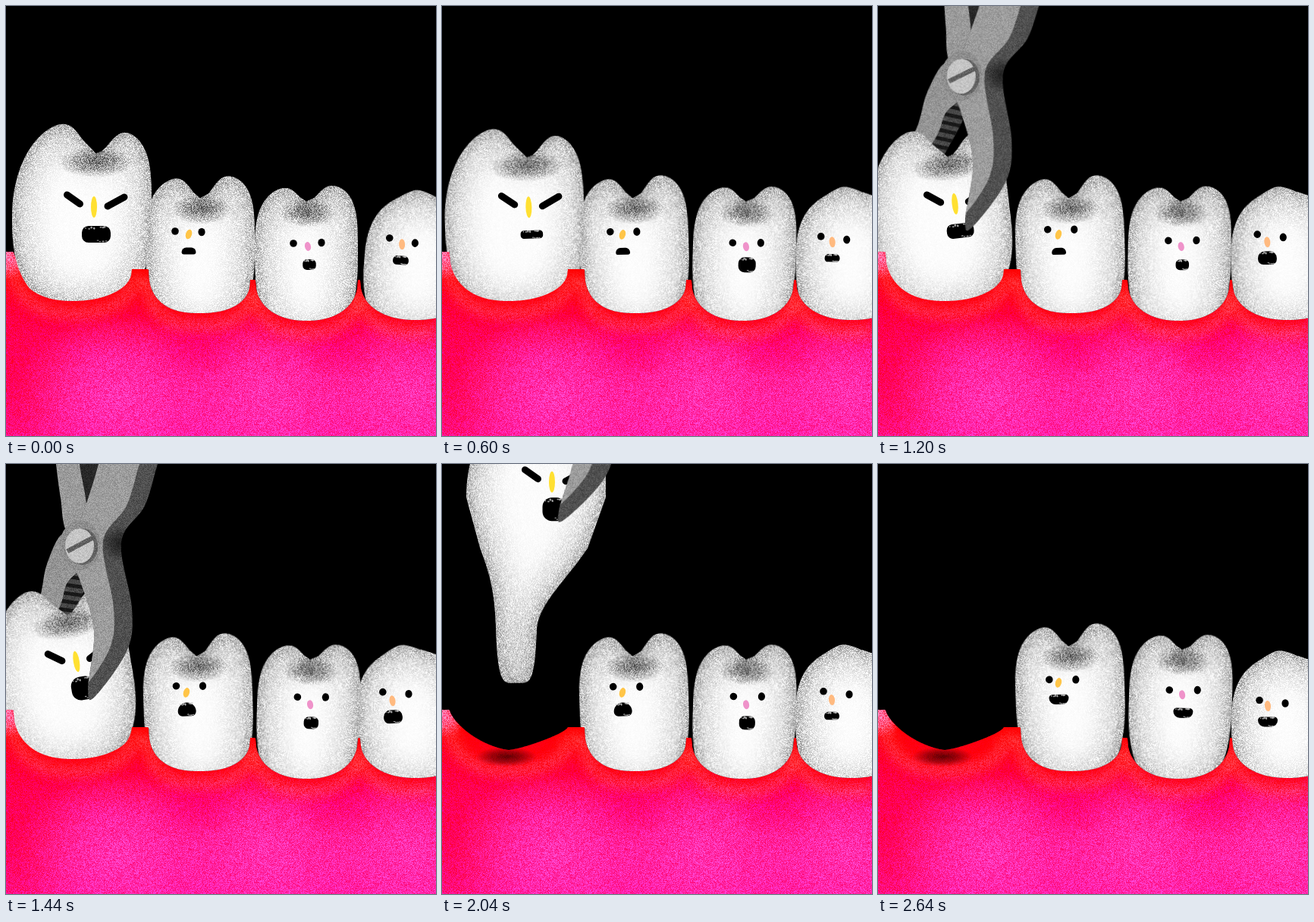
An HTML page with a canvas that plays this animation: 567 px wide and 567 px high, repeating every 2760 ms.

```html
<!DOCTYPE html>
<html lang="en">
<head>
<meta charset="utf-8">
<title>Tooth pulling</title>
<style>
html, body { margin: 0; width: 100%; height: 100%; overflow: hidden; background: #000; }
canvas { display: block; }
</style>
</head>
<body>
<canvas id="stage" width="567" height="567"></canvas>
<script>
const SIZE = 567, STEP = 120, STEPS = 23, PAD = 80;
const GRAB = 6, GRIP = 12, CHEER = 18, GONE = 20;
const ctx = document.getElementById('stage').getContext('2d');

const mix = (a, b, t) => a + (b - a) * t;
const unit = t => Math.max(0, Math.min(1, t));
const smooth = t => { t = unit(t); return t * t * (3 - 2 * t); };
const bump = (s, centre, width) => Math.exp(-(((s - centre) / width) ** 2));
const radians = degrees => degrees * Math.PI / 180;
const power = (v, p) => Math.sign(v) * Math.abs(v) ** p;

function randomizer(seed) {
  return () => {
    seed = (seed + 0x6D2B79F5) | 0;
    let t = Math.imul(seed ^ (seed >>> 15), 1 | seed);
    t = (t + Math.imul(t ^ (t >>> 7), 61 | t)) ^ t;
    return ((t ^ (t >>> 14)) >>> 0) / 4294967296;
  };
}

// Smooth closed curve through flat x, y pairs.
function curve(p) {
  const n = p.length / 2, path = new Path2D();
  const at = i => [p[2 * ((i + n) % n)], p[2 * ((i + n) % n) + 1]];
  path.moveTo(p[0], p[1]);
  for (let i = 0; i < n; i++) {
    const [a, b, c, d] = [at(i - 1), at(i), at(i + 1), at(i + 2)];
    path.bezierCurveTo(b[0] + (c[0] - a[0]) / 6, b[1] + (c[1] - a[1]) / 6,
      c[0] - (d[0] - b[0]) / 6, c[1] - (d[1] - b[1]) / 6, c[0], c[1]);
  }
  path.closePath();
  return path;
}

// Paints once, then adds grain that is strongest in the mid tones.
function sprite(grain, seed, paint) {
  const canvas = document.createElement('canvas');
  canvas.width = canvas.height = SIZE + 2 * PAD;
  const g = canvas.getContext('2d');
  g.translate(PAD, PAD);
  paint(g);
  const image = g.getImageData(0, 0, canvas.width, canvas.height);
  const d = image.data, random = randomizer(seed);
  for (let i = 0; i < d.length; i += 4) {
    const r = (random() - 0.5) * grain;
    for (let c = i; c < i + 3; c++) d[c] += r * d[c] * (255 - d[c]) / 16256;
  }
  g.putImageData(image, 0, 0);
  return canvas;
}

function glow(g, x, y, rx, ry, rgb, alpha) {
  const fade = g.createRadialGradient(0, 0, 0, 0, 0, 1);
  fade.addColorStop(0, `rgba(${rgb},${alpha})`);
  fade.addColorStop(0.5, `rgba(${rgb},${alpha * 0.6})`);
  fade.addColorStop(1, `rgba(${rgb},0)`);
  g.save();
  g.translate(x, y);
  g.scale(rx, ry);
  g.fillStyle = fade;
  g.fillRect(-1, -1, 2, 2);
  g.restore();
}

// Only the shadow of the stroke lands on the canvas.
function softStroke(g, path, width, blur, color, dy = 0) {
  g.save();
  g.shadowColor = color;
  g.shadowBlur = blur;
  g.shadowOffsetX = 2000;
  g.translate(-2000, dy);
  g.lineWidth = width;
  g.stroke(path);
  g.restore();
}

// Gum line: a rounded dip for each tooth between two rims.
const sockets = [
  { from: 188, to: 322, rims: [348, 361], bottom: 405, round: 2.4 },
  { from: 329, to: 464, rims: [362, 362], bottom: 415, round: 2.2 },
  { from: 467, to: 614, rims: [362, 362], bottom: 414, round: 2.2 }
];
const filled = { from: 10, to: 166, rims: [325, 347], bottom: 389, round: 2.2 };
const empty = { ...filled, bottom: 377, round: 1.4 };

function gumLine(firstSocket) {
  const path = new Path2D();
  for (let x = 0; x <= SIZE; x++) {
    const dip = [firstSocket, ...sockets].find(d => x >= d.from && x <= d.to);
    let y = x < 10 ? 324 : x < 200 ? 347 : 361;
    if (dip) {
      const t = (x - dip.from) / (dip.to - dip.from), rim = mix(...dip.rims, t);
      y = rim + (dip.bottom - rim) * (1 - Math.abs(2 * t - 1) ** dip.round) ** (1 / dip.round);
    }
    path.lineTo(x, y);
  }
  return path;
}

function closedAt(line, y) {
  const path = new Path2D(line);
  path.lineTo(SIZE, y);
  path.lineTo(0, y);
  path.closePath();
  return path;
}

const toothLine = gumLine(filled), gumArea = closedAt(gumLine(empty), SIZE);
const aboveGum = closedAt(toothLine, -100);

const gum = sprite(120, 5, g => {
  const base = g.createLinearGradient(0, 350, 0, SIZE);
  base.addColorStop(0, '#ff0008');
  base.addColorStop(0.25, '#ff0038');
  base.addColorStop(0.5, '#ff0878');
  base.addColorStop(1, '#ff18a0');
  g.fillStyle = base;
  g.fill(gumArea);
  g.clip(gumArea);
  glow(g, 0, 480, 120, 140, '255,0,70', 0.8);
  for (const x of [150, 345, 535]) glow(g, x, 510, 135, 105, '255,58,184', 0.8);
  for (const x of [255, 440]) glow(g, x, 450, 60, 45, '255,0,110', 0.5);
  softStroke(g, toothLine, 22, 22, 'rgba(255,0,0,.85)');
  softStroke(g, toothLine, 7, 16, 'rgba(255,110,115,.75)', 17);
  glow(g, 2, 332, 30, 30, '255,120,180', 0.95);
});

const hole = sprite(100, 6, g => {
  g.clip(gumArea);
  glow(g, 85, 386, 40, 13, '45,0,0', 0.75);
});

// Superellipse with a dent between the cusps; with a root the lower half narrows to a stem.
function outline({ cx, cy, w, top, bottom, left, right, dent, at, tilt }, root) {
  const path = new Path2D(), count = 160;
  for (let i = 0; i < count; i++) {
    const a = i / count * 2 * Math.PI, c = Math.cos(a), s = Math.sin(a);
    const n = s > 0 ? (root ? 5 : 2.6) : c < 0 ? left : right;
    const u = power(c, 2 / n), v = power(s, 2 / n);
    let x = cx + w * u, y = cy + (cy - top) * v;
    if (v < 0) {
      y += dent * bump(u, at, 0.27) - tilt * u * v;
    } else {
      y = cy + ((root || bottom) - cy) * v;
      const stem = root ? smooth((y - cy) / 175) : 0;
      x = mix(cx, 74, stem * stem) + mix(w, 28, stem) * u;
    }
    path.lineTo(x, y);
  }
  path.closePath();
  return path;
}

function toothSprite(shape, seed, root) {
  const path = outline(shape, root), { cx, w, top, at, dent } = shape;
  return sprite(150, seed, g => {
    g.fillStyle = '#fcfcfc';
    g.fill(path);
    g.clip(path);
    softStroke(g, path, 14, 46, 'rgba(0,0,0,.55)');
    softStroke(g, path, 7, 14, 'rgba(0,0,0,.34)');
    if (dent > 0) glow(g, cx + w * at, top + dent + 14, w * 0.55, 20, '0,0,0', 0.5);
  });
}

// A tooth says how it leans, hops and talks; its face is placed in its own upright frame.
const bigShape = { cx: 100, cy: 277, w: 92, top: 152, bottom: 399, left: 2, right: 4,
  dent: 40, at: 0.2, tilt: 11 };
const lift = s => Math.max(0, s - GRIP);

const bigTooth = {
  angry: true, base: [95, 389], eyes: [89, 255, 56, 3], nose: [116, 265], mouth: [119, 301],
  noseLook: ['#ffe032', 4, 14, 0],
  art: toothSprite(bigShape, 11), pulledArt: toothSprite(bigShape, 11, 522),
  lean: s => s <= GRIP ? -9.5 * (s / GRIP) ** 2 : -9.5 * (1 - unit(lift(s) / 3)),
  shift: s => [-6 * unit(s / GRIP) ** 2 + 0.24 * lift(s) ** 3,
    6 * unit(s / 5) - 11.8 * lift(s) ** 1.87],
  look: s => [5 * unit(s / 8), -8 * unit(s / 8)],
  talk: { width: 38, mid: 16, swing: 6, period: 12, phase: 0, bend: 0 }
};

const cheer = (s, start) => s < CHEER ? 0 : -13 * Math.sin(Math.PI * (s - start) / 6) ** 2;
const glance = s => [6 * unit(s / 15), -6 * bump(s, 14, 5)];

const smallTeeth = [{
  base: [540, 414], eyes: [497, 304, 34, 4], nose: [514, 311], mouth: [514, 332],
  noseLook: ['#ffba80', 4, 7, -6],
  art: toothSprite({ cx: 538, cy: 333, w: 72, top: 246, bottom: 432, left: 2.5, right: 2.5,
    dent: -8, at: -0.12, tilt: 0 }, 14),
  lean: s => 4.5 * Math.exp(-s / 2) - 2.5 * bump(s, 12, 1.5),
  shift: s => [0, 5 * Math.exp(-s / 2) + (s < CHEER ? 0 : 8 + cheer(s, 16))],
  look: glance,
  talk: { width: 25, mid: 13.5, swing: 4.5, period: 16, phase: 11, bend: -0.2 }
}, {
  base: [390, 415], eyes: [379, 313, 37, -1], nose: [398, 317], mouth: [400, 341],
  noseLook: ['#ef93ca', 4, 6, -12],
  art: toothSprite({ cx: 396, cy: 325, w: 68, top: 235, bottom: 445, left: 3, right: 3.5,
    dent: 23, at: 0.03, tilt: -3 }, 13),
  lean: s => s < GRIP ? 2 * Math.sin(Math.PI * s / 8) ** 2 : 1.8,
  shift: s => [0, cheer(s, 19)],
  look: s => [2 * unit(s / 8), -7 * bump(s, 15, 6)],
  talk: { width: 23, mid: 17, swing: 3, period: 10, phase: 5, bend: 0 }
}, {
  base: [255, 405], eyes: [223, 297, 35, 1], nose: [241, 301], mouth: [241, 323],
  noseLook: ['#ffc548', 4, 6.5, 18],
  art: toothSprite({ cx: 256, cy: 315, w: 72, top: 222, bottom: 438, left: 3, right: 3.5,
    dent: 32, at: 0.03, tilt: -3 }, 12),
  lean: s => -1.7 * (1 - Math.exp(-s)),
  shift: s => [0, cheer(s, 19)],
  look: glance,
  talk: { width: 24, mid: 13, swing: 5, period: 5, phase: 12, bend: -0.8 }
}];

// Both arms are drawn around this pivot at the moment of gripping.
const PIVOT = [98, 107];

const pliersBack = sprite(45, 21, g => {
  const shape = (color, points) => {
    const path = curve(points);
    g.fillStyle = color;
    g.fill(path);
    return path;
  };
  shape('#282828', [92, -60, 97, 0, 105, 50, 122, 0, 132, -60]);
  shape('#9a9a9a', [60, -60, 66, 0, 72, 45, 80, 88, 108, 88, 105, 45, 97, 0, 92, -60]);
  const grip = shape('#484848', [76, 135, 108, 145, 86, 205, 58, 254, 36, 251, 60, 190]);
  g.save();
  g.clip(grip);
  g.strokeStyle = '#181818';
  g.lineWidth = 5;
  for (let y = 140; y < 270; y += 11) {
    g.beginPath();
    g.moveTo(20, y);
    g.lineTo(120, y + 14);
    g.stroke();
  }
  g.restore();
  shape('#949494', [76, 92, 54, 132, 43, 182, 15, 242, 37, 250, 70, 190, 80, 158, 100, 130]);
});

const pliersFront = sprite(45, 22, g => {
  const body = curve([135, -60, 122, 0, 105, 55, 82, 115, 97, 152, 116, 220, 108, 298, 118, 306,
    160, 245, 166, 190, 152, 103, 183, 55, 200, 0, 220, -60]);
  g.fillStyle = '#505050';
  g.fill(body);
  g.save();
  g.clip(body);
  g.translate(-24, 0);
  g.fillStyle = '#9c9c9c';
  g.fill(body);
  g.translate(24, 0);
  glow(g, 152, 105, 28, 24, '0,0,0', 0.6);
  g.restore();
  disc(g, 98, 107, 27, 33, 0, '#8e8e8e');
  disc(g, 101, 109, 20, 24, 0, '#626262');
  disc(g, 97, 108, 19, 23, 0, '#c4c4c4');
  g.strokeStyle = '#606060';
  g.lineWidth = 6;
  g.beginPath();
  g.moveTo(81, 115);
  g.lineTo(115, 97);
  g.stroke();
});

function disc(g, x, y, rx, ry, degrees, color) {
  g.fillStyle = color;
  g.beginPath();
  g.ellipse(x, y, rx, ry, radians(degrees), 0, 7);
  g.fill();
}

// Draws in a frame turned around a pivot that has moved by dx, dy.
function turned([px, py], dx, dy, degrees, paint) {
  ctx.save();
  ctx.translate(px + dx, py + dy);
  ctx.rotate(radians(degrees));
  ctx.translate(-px, -py);
  paint();
  ctx.restore();
}

const stamp = art => ctx.drawImage(art, -PAD, -PAD);

function brow(x, y, dx, dy) {
  ctx.beginPath();
  ctx.moveTo(x - dx, y - dy);
  ctx.lineTo(x + dx, y + dy);
  ctx.stroke();
}

function drawMouth([x, y], tooth, s) {
  let { width: w, mid, swing, period, phase, bend } = tooth.talk;
  const open = Math.cos(2 * Math.PI * (s - phase) / period);
  let h = mid + swing * open;
  w *= 0.88 + 0.12 * open;
  if (tooth.angry && s >= GRIP - 1) [w, h] = [31, 31];
  if (s >= CHEER) [w, h, bend] = [26, 13, 0.8];
  const top = h * (0.4 + Math.max(0, -bend) * 0.5);
  const bottom = h * (0.4 + Math.max(0, bend) * 0.45);
  ctx.fillStyle = '#000';
  ctx.beginPath();
  ctx.roundRect(x - w / 2, y - h / 2, w, h, [top, top, bottom, bottom]);
  ctx.fill();
  if (h < 10) return;
  const random = randomizer(31);
  for (let i = 0; i < 12; i++) {
    const side = i % 3 ? -1 : 1;
    disc(ctx, x + (random() - 0.5) * w * 0.75, y + side * h * (0.3 + random() * 0.16),
      0.7 + random() * 1.1, 0.6 + random(), 0, 'rgba(205,205,205,.75)');
  }
}

function drawFace(tooth, s) {
  const [ex, ey, gapX, gapY] = tooth.eyes, [lookX, lookY] = tooth.look(s);
  const [color, rx, ry, tilt] = tooth.noseLook;
  const x = ex + lookX, y = ey + lookY;
  if (tooth.angry) {
    ctx.strokeStyle = '#000';
    ctx.lineWidth = 9;
    ctx.lineCap = 'round';
    brow(x, y, 8.5, 6);
    brow(x + gapX, y + gapY, 11, -6);
    ctx.translate(lookX, lookY);
  } else {
    disc(ctx, x, y, 4.8, 4.8, 0, '#000');
    disc(ctx, x + gapX, y + gapY, 4.6, 5.3, 0, '#000');
  }
  disc(ctx, ...tooth.nose, rx, ry, tilt, color);
  drawMouth(tooth.mouth, tooth, s);
}

function drawTooth(tooth, s) {
  ctx.save();
  ctx.clip(aboveGum);
  turned(tooth.base, ...tooth.shift(s), tooth.lean(s), () => {
    stamp(tooth.pulledArt && s > GRIP ? tooth.pulledArt : tooth.art);
    drawFace(tooth, s);
  });
  ctx.restore();
}

// The pliers swing in, then stay fixed to the tooth they hold.
function withPliers(s, paint) {
  if (s < GRAB) return;
  if (s <= GRIP) {
    const away = (GRIP - s) ** 2;
    turned(PIVOT, 3.2 * away, -3.8 * away, 0.44 * away, paint);
    return;
  }
  const [gx, gy] = bigTooth.shift(GRIP), [dx, dy] = bigTooth.shift(s);
  const [bx, by] = bigTooth.base;
  turned([bx + gx, by + gy], dx - gx, dy - gy, bigTooth.lean(s) - bigTooth.lean(GRIP), paint);
}

function draw(s) {
  ctx.fillStyle = '#000';
  ctx.fillRect(0, 0, SIZE, SIZE);
  stamp(gum);
  if (s > GRIP) stamp(hole);
  for (const tooth of smallTeeth) drawTooth(tooth, s);
  if (s >= GONE) return;
  const jaw = 5 * unit((GRIP - s) / 4);
  withPliers(s, () => turned(PIVOT, 0, 0, jaw, () => stamp(pliersBack)));
  drawTooth(bigTooth, s);
  withPliers(s, () => stamp(pliersFront));
}

const start = performance.now();
function tick() {
  draw(Math.floor((performance.now() - start) / STEP) % STEPS);
  requestAnimationFrame(tick);
}
tick();
</script>
</body>
</html>
```
